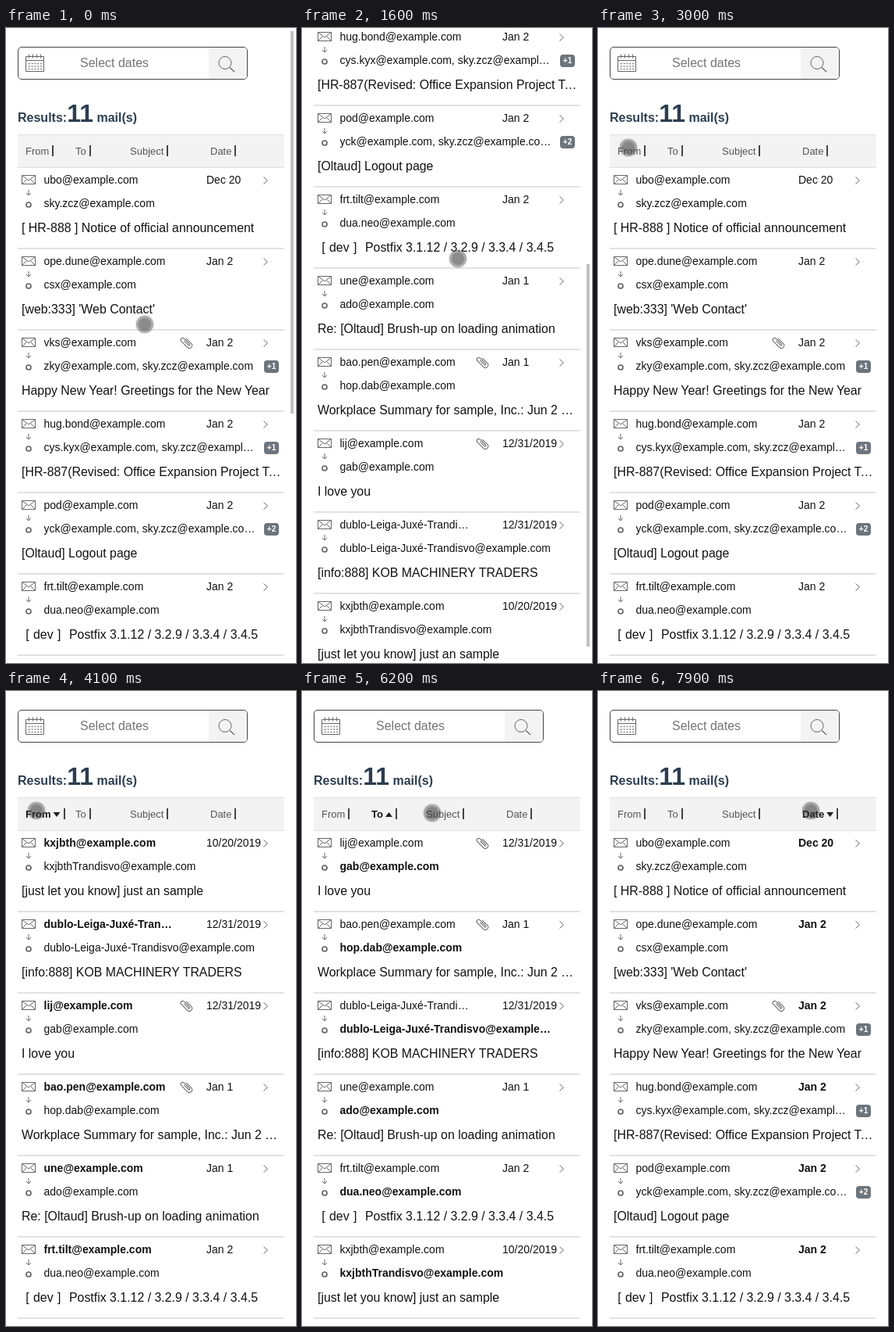
An HTML page for the animation above (8000 ms loop, 372 px wide and 812 px high).

```html
<!DOCTYPE html>
<html lang="en">
<head>
<meta charset="utf-8">
<title>Mail list</title>
<style>
html, body { margin: 0; width: 100%; height: 100%; overflow: hidden; background: #fff; }
body { position: relative; font: 14px/16px "Liberation Sans", Arial, sans-serif; color: #111; }
#page, #page > *, .row > *, #bar, #touch, svg { position: absolute; }
#page { left: 0; top: 0; width: 372px; height: 1335px; will-change: transform; }
svg { left: 0; top: 0; fill: none; stroke: #666; overflow: visible; }
.search { left: 15px; top: 24px; width: 293px; height: 40px; border: 1px solid #444; border-radius: 5px; overflow: hidden; }
.search i { position: absolute; left: 244px; width: 50px; height: 40px; background: #f3f3f3; }
.hint { left: 95px; top: 36px; font-size: 16px; line-height: 17px; color: #757575; }
.count { left: 15px; top: 91px; font-weight: bold; font-size: 16px; line-height: 18px; color: #2c3e50; white-space: nowrap; }
.count span { font-size: 32px; line-height: 36px; }
.head { left: 15px; top: 136px; width: 342px; height: 41px; background: #f3f3f3; border: solid #e0e0e0; border-width: 1px 0; }
.col { top: 150px; font-size: 13px; line-height: 15px; color: #555; white-space: nowrap; }
.col::after { content: ""; display: inline-block; width: 2px; height: 14px; margin-left: 4px; background: #444; vertical-align: -2px; }
.col i { display: none; width: 9px; height: 6px; margin: 0 0 1px 3px; background: #222; clip-path: polygon(0 0, 100% 0, 50% 100%); }
.col.on { font-weight: bold; color: #111; }
.col.on i { display: inline-block; }
.col.up i { clip-path: polygon(0 100%, 100% 100%, 50% 0); }
.row { left: 15px; width: 342px; height: 104px; }
.row::after { content: ""; position: absolute; top: 103px; width: 342px; height: 2px; background: #e2e2e2; }
.row div { white-space: nowrap; overflow: hidden; text-overflow: ellipsis; }
.from { left: 33.5px; top: 8px; width: 170px; }
.to { left: 33.5px; top: 38px; width: 272px; }
.date { left: 242px; top: 8px; }
.subject { left: 5px; top: 69px; width: 336px; font-size: 15.9px; line-height: 17px; }
.by-from .from, .by-to .to, .by-subject .subject, .by-date .date { font-weight: bold; }
.more { left: 316px; top: 39px; width: 19px; height: 16px; border-radius: 4px; background: #6c757d; color: #fff; font: bold 10px/16px "Liberation Sans", Arial, sans-serif; text-align: center; }
#bar { left: 365px; top: 4px; width: 3.5px; height: 489px; background: #c1c1c1; }
#touch { left: -11px; top: -11px; width: 22px; height: 22px; border-radius: 50%; background: radial-gradient(closest-side, rgba(50,50,50,.57) 65%, rgba(80,80,80,.48) 80%); box-shadow: 0 0 2px rgba(80,80,80,.5); }
</style>
</head>
<body>
<div id="page">
  <div class="search"><i></i></div>
  <svg width="372" height="80">
    <path d="M25.5 36.5h23v19h-23zM25.5 41.5h23M29.5 33.5v5M34.5 33.5v5M39.5 33.5v5M44.5 33.5v5"/>
    <path d="M29 45.5h17M29 49h17M29 52.5h17" stroke-width="1.5" stroke-dasharray="1.5 2.3"/>
    <circle cx="281" cy="44.5" r="8"/><path d="M287 50.5l6 5.5" stroke-width="1.3"/>
  </svg>
  <div class="hint">Select dates</div>
  <div class="count">Results:<span>11</span> mail(s)</div>
  <div class="head"></div>
  <div class="col" style="left:25px">From<i></i></div>
  <div class="col" style="left:89px">To<i></i></div>
  <div class="col" style="left:159px">Subject<i></i></div>
  <div class="col" style="left:262px">Date<i></i></div>
</div>
<div id="bar"></div>
<div id="touch"></div>
<script>
const LOOP = 8000, STEP = 100;
const at = name => name + '@example.com';
const extra = at('sky.zcz');
const longName = at('dublo-Leiga-Juxé-Trandisvo');

// from, to, date, subject, attachment, hidden recipients
const mails = [
  [at('ubo'), extra, 'Dec 20', '[ HR-888 ] Notice of official announcement'],
  [at('ope.dune'), at('csx'), 'Jan 2', "[web:333] 'Web Contact'"],
  [at('vks'), at('zky') + ', ' + extra, 'Jan 2', 'Happy New Year! Greetings for the New Year', 1, 1],
  [at('hug.bond'), at('cys.kyx') + ', ' + extra, 'Jan 2', '[HR-887(Revised: Office Expansion Project Team)', 0, 1],
  [at('pod'), at('yck') + ', ' + extra + ', ' + at('csx'), 'Jan 2', '[Oltaud] Logout page', 0, 2],
  [at('frt.tilt'), at('dua.neo'), 'Jan 2', '\u2004[\u2004dev\u2004]\u2004\u2004Postfix 3.1.12 / 3.2.9 / 3.3.4 / 3.4.5'],
  [at('une'), at('ado'), 'Jan 1', 'Re: [Oltaud] Brush-up on loading animation'],
  [at('bao.pen'), at('hop.dab'), 'Jan 1', 'Workplace Summary for sample, Inc.: Jun 2 2019', 1],
  [at('lij'), at('gab'), '12/31/2019', 'I love you', 1],
  [longName, longName, '12/31/2019', '[info:888] KOB MACHINERY TRADERS'],
  [at('kxjbth'), at('kxjbthTrandisvo'), '10/20/2019', '[just let you know] just an sample'],
];

// ascending order of the mails for each column
const orders = {
  from: [0, 1, 2, 3, 4, 5, 6, 7, 8, 9, 10],
  to: [8, 7, 9, 6, 5, 10, 4, 3, 2, 1, 0],
  subject: [2, 8, 6, 7, 0, 4, 3, 9, 10, 1, 5],
  date: [10, 9, 8, 7, 6, 5, 4, 3, 2, 1, 0],
};
const keys = Object.keys(orders);

// time, column, ascending
const clicks = [
  [0, '', true], [3200, 'from', true], [4000, 'from', false], [5000, 'to', false],
  [5700, 'to', true], [6400, 'subject', true], [7300, 'subject', false], [7800, 'date', false],
];

const scrollPath = [[0, 0], [500, 262], [700, 340], [900, 376], [1000, 380], [1100, 380],
  [1600, 495], [1800, 523], [1900, 523], [2400, 140], [2700, 0]];
const touchPath = [[0, 178, 379], [500, 165, 115], [700, 150, 200], [1000, 143, 445], [1100, 143, 439],
  [1600, 200, 295], [1800, 203, 250], [1900, 203, 260], [2400, 200, 650], [2500, 190, 600],
  [2700, 70, 125], [3000, 39, 153], [4500, 39, 153], [4800, 97, 158], [5800, 97, 158],
  [6200, 167, 156], [7300, 167, 156], [7500, 273, 153]];

const page = document.getElementById('page');
const bar = document.getElementById('bar');
const touch = document.getElementById('touch');
const cols = [...document.querySelectorAll('.col')];

const clip = '<path transform="translate(217 16) rotate(-45)" d="M3 -4v9a3.5 3.5 0 0 1-7 0v-11a2.5 2.5 0 0 1 5 0v10a1 1 0 0 1-2 0v-8"/>';

const rows = mails.map(([from, to, date, subject, attached, more]) => {
  const row = document.createElement('div');
  row.className = 'row';
  row.innerHTML = `<svg width="342" height="60">
    <path d="M5.5 10.5h17v11h-17zl8.5 6.5 8.5-6.5M5.5 21.5l6-6M22.5 21.5l-6-6"/>
    <path d="M14 29v6.5M11 33l3 3 3-3"/><circle cx="14" cy="48" r="3" stroke-width="1.7"/>
    <path d="M315.5 12.5l5 4.5-5 4.5"/>${attached ? clip : ''}</svg>
    <div class="from">${from}</div><div class="date">${date}</div>
    <div class="to">${to}</div><div class="subject">${subject}</div>
    ${more ? `<div class="more">+${more}</div>` : ''}`;
  return page.appendChild(row);
});

let shown;
function sortBy(click) {
  if (click === shown) return;
  shown = click;
  const [, key, up] = click;
  const order = [...orders[key || 'from']];
  if (!up) order.reverse();
  order.forEach((mail, i) => rows[mail].style.top = 178 + 104 * i + 'px');
  page.className = key ? 'by-' + key : '';
  cols.forEach((col, i) => {
    col.classList.toggle('on', keys[i] === key);
    col.classList.toggle('up', up);
  });
}

function along(path, t) {
  const i = path.findIndex(p => p[0] > t);
  if (i < 0) return path[path.length - 1].slice(1);
  const a = path[i - 1], b = path[i], k = (t - a[0]) / (b[0] - a[0]);
  return a.slice(1).map((v, n) => v + (b[n + 1] - v) * k);
}

function draw(now) {
  const t = Math.floor(now % LOOP / STEP) * STEP;
  const scroll = Math.round(along(scrollPath, t)[0]);
  const [x, y] = along(touchPath, t);
  sortBy(clicks.filter(c => c[0] <= t).pop());
  page.style.transform = `translateY(${-scroll}px)`;
  bar.style.transform = `translateY(${scroll * 0.602}px)`;
  bar.style.opacity = t < 2700 ? 1 : 0;
  touch.style.transform = `translate(${x}px, ${y}px)`;
}

const start = performance.now();
(function tick() {
  draw(performance.now() - start);
  requestAnimationFrame(tick);
})();
</script>
</body>
</html>
```
